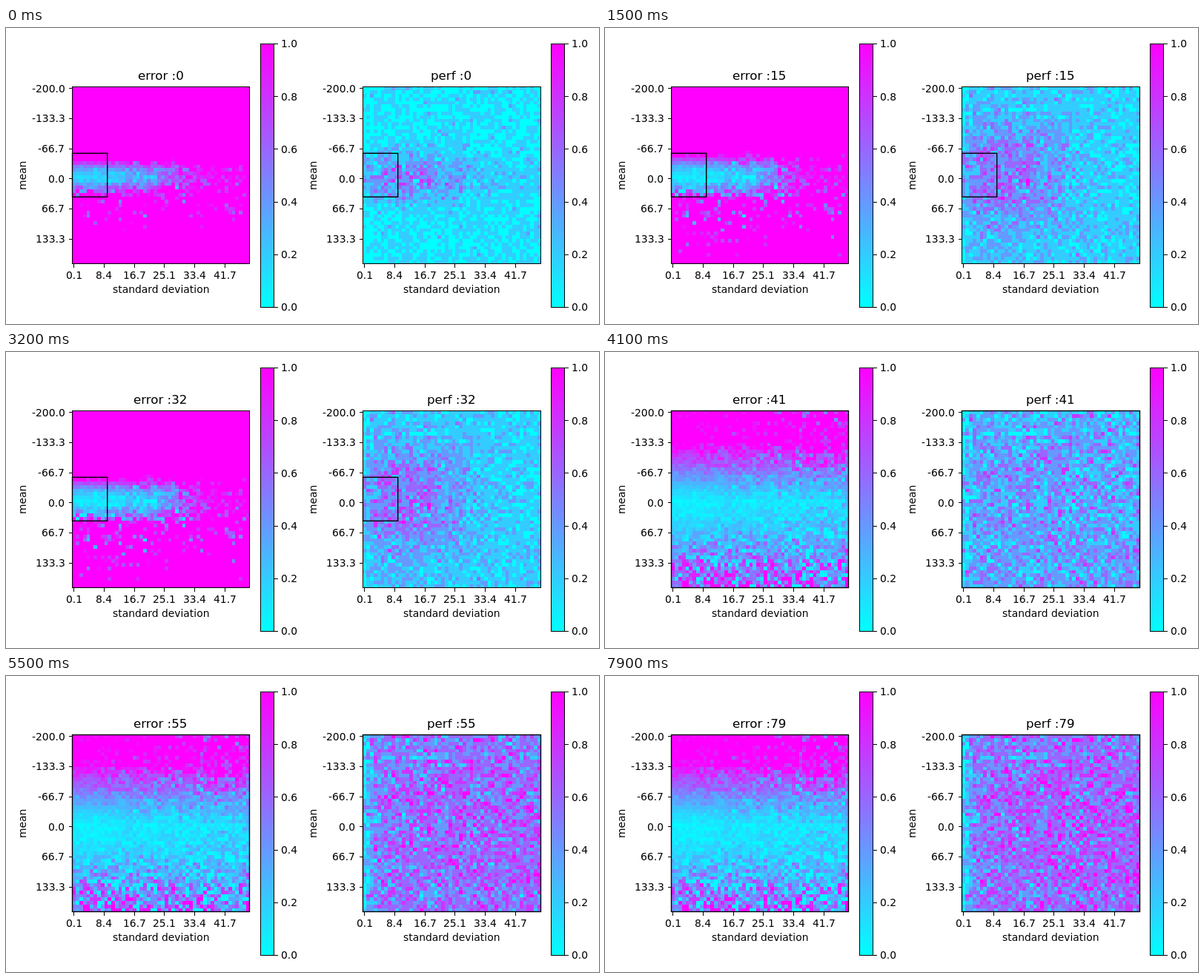
Animation, 800 px wide and 400 px high, one loop 8 s. Source, as an HTML page with a canvas:

```html
<!DOCTYPE html>
<html lang="en">
<head>
<meta charset="utf-8">
<title>error and perf</title>
<style>
  html, body { margin: 0; width: 100%; height: 100%; overflow: hidden; background: #fff; }
  canvas, svg { position: absolute; left: 0; top: 0; width: 800px; height: 400px; }
  text { font: 13.89px "DejaVu Sans", sans-serif; fill: #000; }
  .title { font-size: 16.67px; }
  .line { fill: none; stroke: #000; stroke-width: 1; shape-rendering: crispEdges; }
  .box { fill: none; stroke: #000; stroke-width: 1.39; }
</style>
</head>
<body>
<canvas id="cells" width="800" height="400"></canvas>
<svg id="chart" viewBox="0 0 800 400">
  <defs>
    <linearGradient id="cool" x1="0" y1="1" x2="0" y2="0">
      <stop offset="0" stop-color="#0ff"/><stop offset="1" stop-color="#f0f"/>
    </linearGradient>
  </defs>
</svg>
<script>
const N = 50, HEIGHT = 239, TOP = 79.5, BAR = 356, STEP = 100, FRAMES = 80, SWITCH = 40;
const panels = [
  { name: 'error', x: 89.5, width: 239 },
  { name: 'perf', x: 481.5, width: 240 }
];
const chart = document.getElementById('chart');
const ctx = document.getElementById('cells').getContext('2d');

// ---------- axes, labels and colour bars ----------
function add(tag, attrs) {
  const el = document.createElementNS('http://www.w3.org/2000/svg', tag);
  for (const key in attrs) el.setAttribute(key, attrs[key]);
  return chart.appendChild(el);
}
const line = d => add('path', { d, class: 'line' });
const rect = (x, y, width, height, more) => add('rect', { x, y, width, height, ...more });
const snap = v => Math.floor(v) + 0.5;

// Sets a label on whole pixels; align is 0 for left, 0.5 for centre, 1 for right
function write(el, x, label, align = 0.5) {
  el.textContent = label;
  el.setAttribute('x', Math.round(x - align * el.getComputedTextLength()));
}
function text(x, y, label, align, more) {
  const el = add('text', { y: Math.round(y), ...more });
  write(el, x, label, align);
  return el;
}

for (const p of panels) {
  const { x, width } = p, bottom = TOP + HEIGHT, bar = x + 254;
  rect(x, TOP, width, HEIGHT, { class: 'line' });
  for (let i = 0; i < 6; i++) {
    const d = 2.4 + 40.63 * i, y = 21.5 + BAR * (1 - i / 5);
    line(`M${snap(x + d)} ${bottom}v5`);
    line(`M${x} ${snap(TOP + d)}h-5`);
    line(`M${bar + 18} ${snap(y)}h5`);
    text(x + d, 339, (0.1 + 8.317 * i).toFixed(1));
    text(x - 10.2, TOP + d + 4.9, (-200 + i * 200 / 3).toFixed(1).replace('-0.0', '0.0'), 1);
    text(bar + 27.4, y + 4.9, (i / 5).toFixed(1), 0);
  }
  text(x + width / 2, 358, 'standard deviation');
  text(0, 0, 'mean', 0.5, { transform: `translate(${x - 62.5} 199) rotate(-90)` });
  rect(bar, 21.5, 18, BAR, { fill: 'url(#cool)' });
  rect(bar, 21.5, 18, BAR, { class: 'line' });
  p.title = add('text', { y: 70, class: 'title' });
  p.box = add('rect', { x, class: 'box' });
}

// ---------- seeded noise ----------
function random(seed) {
  return () => {
    seed = (seed + 0x6D2B79F5) | 0;
    let t = Math.imul(seed ^ (seed >>> 15), 1 | seed);
    t = (t + Math.imul(t ^ (t >>> 7), 61 | t)) ^ t;
    return ((t ^ (t >>> 14)) >>> 0) / 4294967296;
  };
}
function field(seed) {
  const r = random(seed);
  return Array.from({ length: N * N }, () => (r() + r() + r() + r() - 2) * 1.73);
}
const errorNoise = field(17), perfNoise = field(91);

// ---------- values; w runs from 0 to 1 while each stage learns ----------
const mix = (a, b, w) => a + (b - a) * w;
const hump = (v, mid, width) => Math.exp(-(((v - mid) / width) ** 2));

// Low error only near mean 0 and small deviations
function narrowError(c, y, g, w) {
  const far = Math.abs(y);
  const rise = mix(.15, .08, w) + (far / mix(5, 6.3, w)) ** 1.8;
  const cap = 1.1 + mix(.004, .0016, w) * y * y;
  const row = y > 0 ? Math.min(rise, cap) : rise;
  const col = 1.15 / (1 + Math.exp((mix(26, 29, w) - c) / mix(6, 4.5, w)));
  const rowSd = y > 0 ? .45 * (1 - hump(y, 0, 5)) : .02 * far;
  const colSd = .02 + .33 * (c / N) ** 1.3;
  return Math.hypot(row, col) + g * Math.hypot(rowSd, colSd);
}

// Low error in a broad band, noisy towards the bottom
function wideError(c, y, g, w) {
  const far = Math.abs(y) / 25, right = c / N;
  const base = y < 0
    ? Math.min(1.12, .04 + mix(1.6, 1.4, w) * far ** 1.15)
    : .04 + mix(.7, .6, w) * far ** mix(1.3, 1.5, w);
  const sd = y < 0 ? .02 + far * (.05 + .2 * Math.sqrt(right)) : .02 + .44 * far * far;
  return base + .12 * right * hump(y, 0, 8) + g * (sd + .08 * right);
}

// Mean and spread of successes in five trials, before and after each stage
const perfStages = [
  (c, r) => {
    const h = hump(c, 12, 16) * hump(r, 25, 6);
    return [.5 + 1.6 * h + .5 * hump(r, 26, 7) - .5 * Math.exp(-c / 2), .5 + .5 * h];
  },
  (c, r) => {
    const h = hump(c, 11, 17) * hump(r, 25, 17);
    return [.9 + 1.9 * h - .7 * Math.exp(-c / 1.5), .6 + .35 * h];
  },
  (c, r) => [1.85 - 1.2 * Math.exp(-c / 1.5) - .5 * Math.exp(-r / 4), .95],
  (c, r) => [2.75 + .7 * (c / N) * hump(r, 26, 18) - 2.2 * Math.exp(-c / 2.3), 1]
];
function perf(c, r, g, wide, w) {
  const i = wide ? 2 : 0;
  const a = perfStages[i](c, r), b = perfStages[i + 1](c, r);
  return Math.round(mix(a[0], b[0], w) + g * mix(a[1], b[1], w)) / 5;
}

function paint(p, c, r, v) {
  const edgeX = k => Math.round(p.x + p.width * k / N);
  const edgeY = k => Math.round(TOP + HEIGHT * k / N);
  const x = edgeX(c), y = edgeY(r);
  const q = Math.round(255 * Math.min(1, Math.max(0, v)));
  ctx.fillStyle = `rgb(${q},${255 - q},255)`;
  ctx.fillRect(x, y, edgeX(c + 1) - x, edgeY(r + 1) - y);
}

function draw(n) {
  const wide = n >= SWITCH;
  const w = 1 - Math.exp(wide ? -Math.max(0, n - SWITCH - 1) / 6 : -n / 4);
  const error = wide ? wideError : narrowError;
  const shake = random(n * 7919 + 5);
  for (let r = 0; r < N; r++) {
    for (let c = 0; c < N; c++) {
      const k = r * N + c;
      paint(panels[0], c, r, Math.max(.02, error(c, r - 25, errorNoise[k], w)));
      paint(panels[1], c, r, perf(c, r, perfNoise[k] + (shake() - .5) * .12, wide, w));
    }
  }
  for (const p of panels) {
    write(p.title, p.x + p.width / 2 - 0.5, `${p.name} :${n}`);
    p.box.setAttribute('y', wide ? TOP : 169.3);
    p.box.setAttribute('width', wide ? p.width : 47.2);
    p.box.setAttribute('height', wide ? HEIGHT : 59);
  }
}

const start = performance.now();
let shown = -1;
function tick() {
  const n = Math.floor((performance.now() - start) / STEP) % FRAMES;
  if (n !== shown) draw(shown = n);
  requestAnimationFrame(tick);
}
tick();
</script>
</body>
</html>
```
